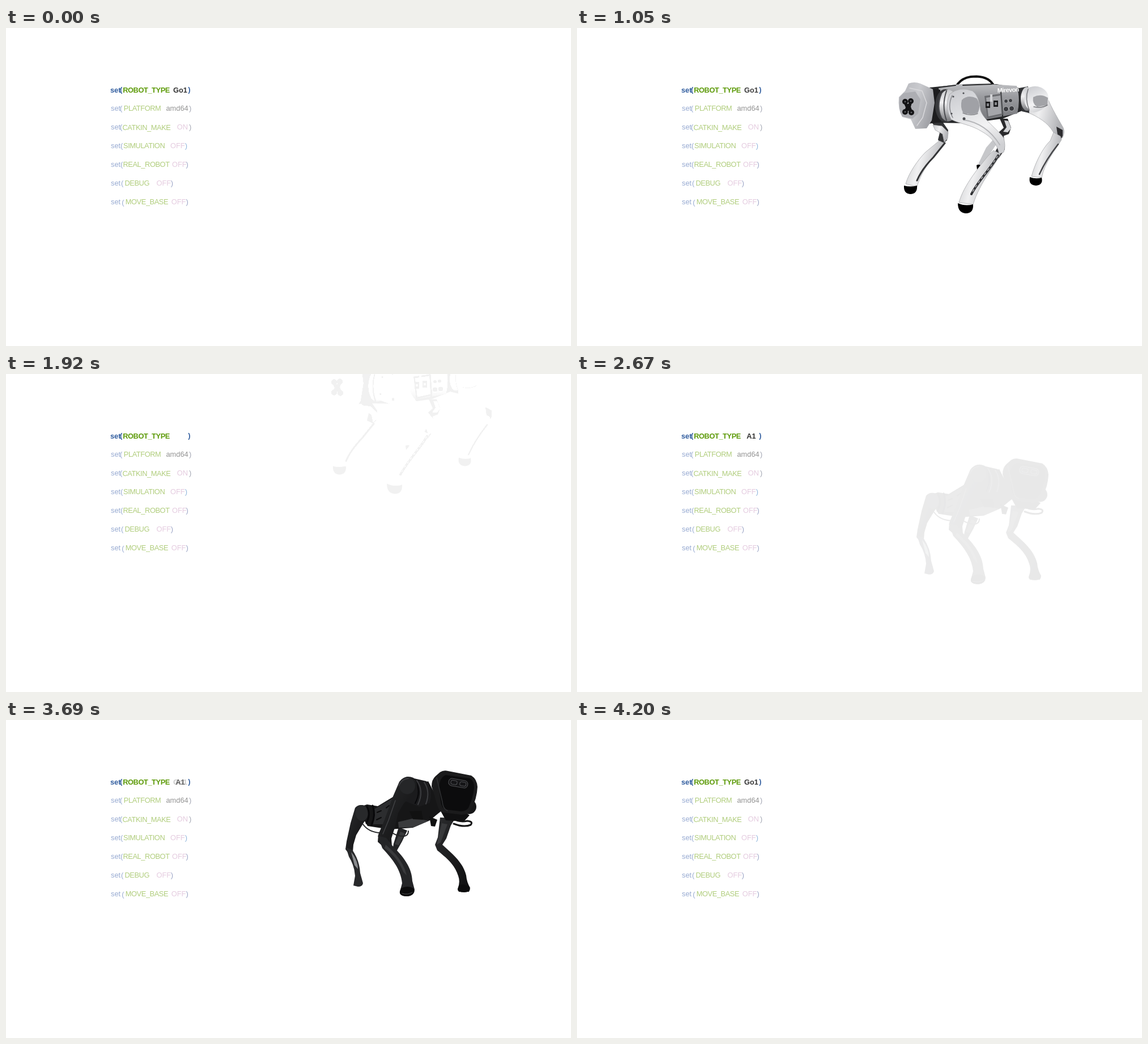
Recreate the animation shown at these times as an HTML page. Size 997 by 561 pixels, loop 4320 ms.

```html
<!DOCTYPE html>
<html lang="en">
<head>
<meta charset="utf-8">
<title>Robot settings</title>
<style>
  html, body { margin: 0; width: 100%; height: 100%; overflow: hidden; background: #fff; }
  svg { display: block; width: 100%; height: 100%; }
  text { font: 12.8px "Liberation Sans", Arial, sans-serif; white-space: pre; }
  .bold { font-weight: 700; }
  .label { letter-spacing: -.4px; }
  .line { fill: none; stroke-linecap: round; stroke-linejoin: round; }
  .limb { fill: url(#limb); stroke: #a9aaad; stroke-width: .8; }
</style>
</head>
<body>
<svg viewBox="0 0 997 561">
  <defs>
    <linearGradient id="shell" x1="0" y1="0" x2="0" y2="1">
      <stop offset="0" stop-color="#bfc0c3"/><stop offset=".35" stop-color="#9c9da1"/><stop offset="1" stop-color="#77787c"/>
    </linearGradient>
    <linearGradient id="head" x1="0" y1="0" x2="1" y2=".4">
      <stop offset="0" stop-color="#b4b5ba"/><stop offset=".55" stop-color="#c9cace"/><stop offset="1" stop-color="#a2a3a8"/>
    </linearGradient>
    <linearGradient id="limb" x1="0" y1="0" x2="1" y2=".3">
      <stop offset="0" stop-color="#c6c7ca"/><stop offset=".45" stop-color="#f0f0f1"/><stop offset="1" stop-color="#b2b3b7"/>
    </linearGradient>
    <linearGradient id="thigh" x1=".2" y1="0" x2=".6" y2="1">
      <stop offset="0" stop-color="#cbccd0"/><stop offset=".3" stop-color="#dcdde0"/><stop offset=".65" stop-color="#f3f3f4"/><stop offset="1" stop-color="#cfd0d3"/>
    </linearGradient>
    <linearGradient id="ring" x1="0" y1="0" x2="0" y2="1">
      <stop offset="0" stop-color="#c8c9cc"/><stop offset=".4" stop-color="#f1f1f2"/><stop offset="1" stop-color="#77787c"/>
    </linearGradient>
    <linearGradient id="coal" x1="0" y1="0" x2="1" y2="1">
      <stop offset="0" stop-color="#2b2c2e"/><stop offset="1" stop-color="#0e0e0f"/>
    </linearGradient>
  </defs>

  <g id="code"></g>

  <g id="silver" opacity="0">
    <!-- far rear leg -->
    <path fill="#2a2a2c" d="M746 160L760 160L766 176L762 187L748 192L742 186L753 176Z"/>
    <path fill="#d2d3d6" d="M754 163L761 164L766 177L760 184L752 183L758 175Z"/>
    <path fill="#c6c7ca" d="M743 187L751 191L738 208L715 243L708 240L722 211Z"/>
    <path d="M705 242Q711 239 715 245Q712 251 706 250Z"/>
    <!-- far front leg -->
    <path fill="#333436" d="M624 164L644 164L655 180L653 198L643 206L637 197L640 185Z"/>
    <path class="limb" d="M628 171L644 173L655 184L654 195L648 201L645 187L632 180Z"/>
    <path class="limb" d="M639 199L650 204L626 232C611 250 604 266 600 280L580 275C585 256 602 232 615 219Z"/>
    <path class="line" stroke="#343537" stroke-width="3" d="M649 203L629 228Q609 248 600 269"/>
    <path d="M577 278Q588 281 600 278Q601 293 588 293Q576 292 577 278Z"/>
    <!-- near rear leg -->
    <path class="limb" d="M790 112L826 112C833 134 846 155 858 176Q861 184 857 193L849 198L840 183C831 167 813 156 795 149Z"/>
    <path fill="#2d2d30" d="M846 174L857 180L857 190L850 205L843 200L848 188Z"/>
    <path class="limb" d="M841 184L853 191L855 197C844 216 825 237 820 264L802 262C808 238 823 210 835 199Z"/>
    <path class="line" stroke="#46474a" stroke-width="2.5" d="M849 205Q827 233 816 258"/>
    <path d="M799 263Q809 267 820 264Q823 277 810 278Q796 277 799 263Z"/>
    <!-- trunk -->
    <path class="line" stroke="#111" stroke-width="4" d="M669 103C679 86 695 85.500 705 85.500C720 86 731 92 736 103"/>
    <path fill="#252628" d="M622 105L672 100L740 99L786 107L788 145L751 160L690 168L622 167Z"/>
    <path fill="url(#shell)" d="M638 106Q660 98 710 98L776 102Q783 125 777 151L724 161L650 157Z"/>
    <path class="line" stroke="#2b2c2e" stroke-width="2" d="M637 105L668 101M681 101L732 99M748 113L751 156"/>
    <path fill="#6b6c70" d="M719 120L748 116L751 153L724 159Z"/>
    <path fill="#a5a6aa" d="M722 123L747 119L749 151L726 156Z"/>
    <path fill="#1b1b1d" d="M721 130h8v11h-8zM735 128h8v11h-8z"/>
    <path fill="#d2d3d6" d="M729 117h4v13h-4z"/>
    <path fill="#85868a" d="M723 133h4v5h-4zM737 131h4v5h-4z"/>
    <g fill="#3c3d41" stroke="#b4b5b8" stroke-width="1">
      <circle cx="757" cy="129" r="3.500"/><circle cx="765" cy="128" r="3.500"/>
      <circle cx="757" cy="143" r="4.500"/><circle cx="767" cy="142" r="4.500"/>
    </g>
    <text class="bold" fill="#fff" style="font-size:11px;letter-spacing:-.6px" transform="translate(742 114) rotate(-3)">Mirevon</text>
    <!-- rear hip -->
    <path fill="#333437" d="M780 106L796 103L798 150L785 147Z"/>
    <ellipse cx="794" cy="125" rx="11" ry="21" fill="url(#ring)"/>
    <path fill="url(#thigh)" d="M792 109Q804 99 819 105Q834 112 832 130Q825 146 806 149Q790 142 789 126Z"/>
    <path fill="#a2a3a7" d="M805 122Q818 115 831 123L830 136L812 139Q803 134 805 122Z"/>
    <path class="line" stroke="#77787c" stroke-width="1.500" d="M796 108Q790 125 798 145M806 139Q820 142 830 136"/>
    <!-- head -->
    <path fill="#1d1d1f" d="M618 106L641 109L642 166L620 169Z"/>
    <path fill="url(#head)" d="M585 98Q595 94 606 98L628 108L631 132L626 163L617 177L597 178L589 161L574 157Q566 144 568 122L579 111Z"/>
    <path fill="#adaeb3" d="M576 115L597 112L606 126L602 151L592 160L574 156Q566 141 570 122Z"/>
    <path class="line" stroke="#d9d9dc" stroke-width="1.500" d="M587 106L609 111L617 132L610 158L600 172"/>
    <g fill="#141416">
      <path d="M576 131L584 134L592 128L589 139L593 150L584 146L576 151L580 140Z"/>
      <circle cx="579" cy="130" r="5"/><circle cx="589" cy="129" r="5"/>
      <circle cx="579" cy="148" r="5"/><circle cx="590" cy="149" r="5"/>
    </g>
    <g fill="#65666b">
      <circle cx="579" cy="130" r="1.300"/><circle cx="589" cy="129" r="1.300"/>
      <circle cx="579" cy="148" r="1.300"/><circle cx="590" cy="149" r="1.300"/>
    </g>
    <!-- front hip and near front leg -->
    <ellipse cx="650" cy="137" rx="18" ry="29" fill="#38393c"/>
    <ellipse cx="655" cy="137" rx="17" ry="28" fill="url(#ring)"/>
    <path class="line" stroke="#4a4b4f" stroke-width="2" d="M643 116Q634 138 643 158M652 111Q643 137 652 163"/>
    <path fill="#2d2d30" d="M738 186L753 190L755 214L744 230L734 226L744 207Z"/>
    <path fill="url(#thigh)" stroke="#a9aaad" stroke-width=".8" d="M657 117Q675 102 698 111Q709 119 712 145C717 162 742 178 753 194Q757 208 753 219L745 222C741 204 731 192 715 183C695 170 674 169 660 161Q648 138 657 117Z"/>
    <path fill="#a0a1a6" d="M679 127Q690 117 705 124Q714 136 707 150Q694 155 681 149Q676 139 679 127Z"/>
    <path class="line" stroke="#88898d" stroke-width="1.500" d="M662 119Q653 139 663 158M681 150Q694 156 707 151"/>
    <path class="line" stroke="#b5b6b9" stroke-width="2" d="M682 162Q722 168 746 206"/>
    <g fill="#4c4d51">
      <circle cx="664" cy="121" r="1.600"/><circle cx="682" cy="115" r="1.600"/>
      <circle cx="661" cy="151" r="1.600"/><circle cx="683" cy="160" r="2.500"/>
    </g>
    <path class="limb" d="M735 216L747 222C739 241 711 272 699 311L674 308C682 277 713 241 726 225Z"/>
    <path class="line" stroke="#303134" stroke-width="4" d="M743 225C734 243 709 268 696 293"/>
    <path class="line" stroke="#cfcfd2" stroke-width="1.200" stroke-dasharray="4 5" d="M742 226C733 243 709 268 697 291"/>
    <path d="M672 309Q685 315 699 311Q700 327 686 327Q672 326 672 309Z"/>
  </g>

  <g id="black" opacity="0">
    <!-- far legs -->
    <path fill="#222325" d="M693 189L708 195L699 214L690 230L691 244L681 236L684 218Z"/>
    <path fill="#38393b" d="M696 197L704 200L693 221L686 219Z"/>
    <path fill="url(#coal)" d="M766 172L793 173L785 186L777 209L770 220C787 236 806 250 812 274Q813 286 819 296L817 303L799 303L797 298Q802 286 798 275C791 253 775 242 761 230L757 220L762 207Z"/>
    <path fill="#38393b" d="M769 182L779 184L767 216L760 220Z"/>
    <path fill="#0c0c0d" d="M800 291Q810 288 818 296Q821 303 809 304Q797 304 797 299Z"/>
    <!-- near rear leg -->
    <path fill="url(#coal)" d="M616 155Q624 146 636 153Q641 168 630 183L618 203L613 220L612 233L605 236L599 228L601 214L608 182Z"/>
    <path fill="#28292b" d="M600 225L611 229Q624 248 625 270L630 288Q629 294 621 294L613 292L616 275Q615 257 605 241Z"/>
    <path fill="#898b8e" d="M609 233Q621 247 621 263L615 256Z"/>
    <!-- trunk -->
    <path fill="#161617" d="M619 155L637 149L656 152L689 132L745 108L771 158L748 177L718 190L677 193L638 187Z"/>
    <path fill="#2c2d2f" d="M650 157L691 133L686 157L668 184L648 184Z"/>
    <path class="line" stroke="#0b0b0c" stroke-width="2" d="M655 163L662 160M671 155L676 151M654 176L662 172"/>
    <path fill="#3a3b3d" d="M692 180L721 173L746 178L720 189L693 190Z"/>
    <path fill="#111" d="M712 161L733 160L736 176L718 175ZM747 170L761 176L757 188L750 187Z"/>
    <ellipse cx="628" cy="164" rx="11" ry="14" fill="#28292b"/>
    <path class="line" stroke="#08080a" stroke-width="3" d="M637 153Q644 166 636 182M647 151Q653 168 645 185"/>
    <path class="line" stroke="#222325" stroke-width="2" d="M630 184Q640 198 660 199M679 197Q688 205 702 205Q710 204 710 196"/>
    <!-- shoulder -->
    <path fill="#1b1b1d" d="M707 100L742 108Q754 120 748 146L729 153L704 143Z"/>
    <path class="line" stroke="#3c3d40" stroke-width="2" d="M725 107Q738 125 727 149M738 110Q749 126 741 148"/>
    <path class="line" stroke="#08080a" stroke-width="2" d="M721 105Q734 125 722 147"/>
    <!-- head -->
    <circle cx="817" cy="153" r="13" fill="#171718"/>
    <path class="line" stroke="#151516" stroke-width="3" d="M790 174Q800 181 814 178Q825 179 820 185Q808 190 790 183"/>
    <path fill="#101011" d="M765 157L806 160L818 168L808 179L776 177Z"/>
    <path fill="#1b1b1c" d="M766 92Q772 88 780 90L821 98Q831 104 832 118Q831 139 821 158Q816 167 804 167L770 163Q763 160 760 147L751 117Q751 105 758 99Z"/>
    <path fill="#0c0c0d" d="M776 97L818 103Q827 108 826 120Q824 138 816 155Q811 162 801 161L776 158Q768 155 767 143L764 120Q765 101 776 97Z"/>
    <path class="line" stroke="#303133" stroke-width="1.500" d="M760 102L770 144Q771 157 779 160"/>
    <g transform="rotate(10 798 111)" fill="#151517" stroke="#515255">
      <rect x="781" y="105" width="34" height="13" rx="6"/>
      <rect x="785" y="108" width="11" height="7" rx="3"/>
      <rect x="801" y="108" width="11" height="7" rx="3"/>
    </g>
    <!-- near front leg -->
    <path fill="url(#coal)" d="M694 109Q704 96 719 102Q731 114 721 128L702 147L692 164L687 187L680 209L681 223L664 222L656 215L657 202L668 176L682 137Z"/>
    <ellipse cx="708" cy="116" rx="14" ry="15" fill="#252628"/>
    <path class="line" stroke="#404144" stroke-width="1.500" d="M693 116Q698 104 710 103M687 142L675 177L665 201"/>
    <path fill="#242527" d="M656 204L671 208L682 222C700 240 716 259 717 284L721 299Q721 310 708 311Q695 311 695 303L699 288C697 266 684 247 664 226Z"/>
    <path fill="#393a3c" d="M670 220Q701 246 707 274L701 268Q691 242 668 226Z"/>
    <path fill="#0b0b0c" d="M697 297Q709 291 719 297Q723 308 709 311Q693 311 695 302Z"/>
    <path class="line" stroke="#48494b" stroke-width="1" d="M699 306Q709 309 717 304"/>
  </g>
</svg>
<script>
const LOOP = 4320, STEP = 30;
const NS = "http://www.w3.org/2000/svg";
const code = document.getElementById("code");
const silver = document.getElementById("silver");
const black = document.getElementById("black");

const GREEN = "#b0cd7c", BLUE = "#98abd2", PINK = "#e4cbdf", GREY = "#929292";

function put(str, x, y, fill, cls = "") {
  const el = document.createElementNS(NS, "text");
  el.textContent = str;
  el.setAttribute("x", x);
  el.setAttribute("y", y);
  el.setAttribute("fill", fill);
  el.setAttribute("class", cls);
  return code.appendChild(el);
}

put("set", 184, 113.5, "#315d9f", "bold");
put("(", 201, 113, "#315d9f", "bold");
put("ROBOT_TYPE", 206.2, 113.5, "#5e9b0b", "bold label");
put(")", 321.3, 113, "#315d9f", "bold");
const first = put("Go1", 295, 113.5, "#333", "bold");
const second = put("A1", 299.3, 113.5, "#333", "bold");

// y, bracket x, bracket drop, label, label x, label drop, value, value x, value fill, closing x, closing fill
const rows = [
  [146.3, 201, 0, "PLATFORM", 207.8, 0, "amd64", 282.5, GREY, 323, "#a2a5b2"],
  [179, 201, 0, "CATKIN_MAKE", 205.5, .8, "ON", 301.7, PINK, 323, "#a2a5b2"],
  [212.3, 202, 0, "SIMULATION", 207, 0, "OFF", 290, PINK, 315.7, "#8fb5dc"],
  [245, 202, 0, "REAL_ROBOT", 206.5, 0, "OFF", 293, PINK, 317.4, "#9ba4c6"],
  [277.8, 203, 0, "DEBUG", 209.5, 0, "OFF", 265.5, PINK, 290.8, "#9ba4c6"],
  [311.2, 204.3, 1, "MOVE_BASE", 210.8, 0, "OFF", 291.8, PINK, 317.4, "#9ba4c6"]
];
for (const [y, bx, drop, label, lx, ldrop, value, vx, fill, cx, cfill] of rows) {
  put("set", 185, y, BLUE);
  put("(", bx, y + drop, BLUE);
  put(label, lx, y + ldrop, GREEN, "label");
  put(value, vx, y, fill);
  put(")", cx, y, cfill);
}

const ramp = (t, from, to) => Math.min(1, Math.max(0, (t - from) / (to - from)));
const sine = p => (1 - Math.cos(Math.PI * p)) / 2;

function pose(el, alpha, dy = 0) {
  el.setAttribute("opacity", alpha.toFixed(3));
  el.setAttribute("transform", `translate(0 ${dy.toFixed(2)})`);
}

function draw(t) {
  const swap = ramp(t, 3660, 3780);
  pose(first, t < 3000 ? 1 - ramp(t, 1030, 1600) : swap);
  pose(second, ramp(t, 2100, 2670) * (1 - swap));

  // The silver robot leaves upwards; only its dark parts linger before it vanishes.
  const leave = ramp(t, 1728, 1932);
  const trace = t < 1920 ? 0 : t < 2010 ? .05 : t < 2070 ? .025 : 0;
  silver.style.filter = trace ? "grayscale(1) contrast(12) brightness(1.1)" : "none";
  pose(silver, trace || ramp(t, 30, 240) * (1 - leave), -116.5 * sine(leave));

  // The black robot rises into place and later fades where it stands.
  const enter = ramp(t, 2640, 2970);
  pose(black, enter * (1 - ramp(t, 3900, 4200)), 61 * (1 - sine(enter)));
}

const start = performance.now();
function tick() {
  const t = (performance.now() - start) % LOOP;
  draw(Math.floor(t / STEP) * STEP);
  requestAnimationFrame(tick);
}
draw(0);
requestAnimationFrame(tick);
</script>
</body>
</html>
```
